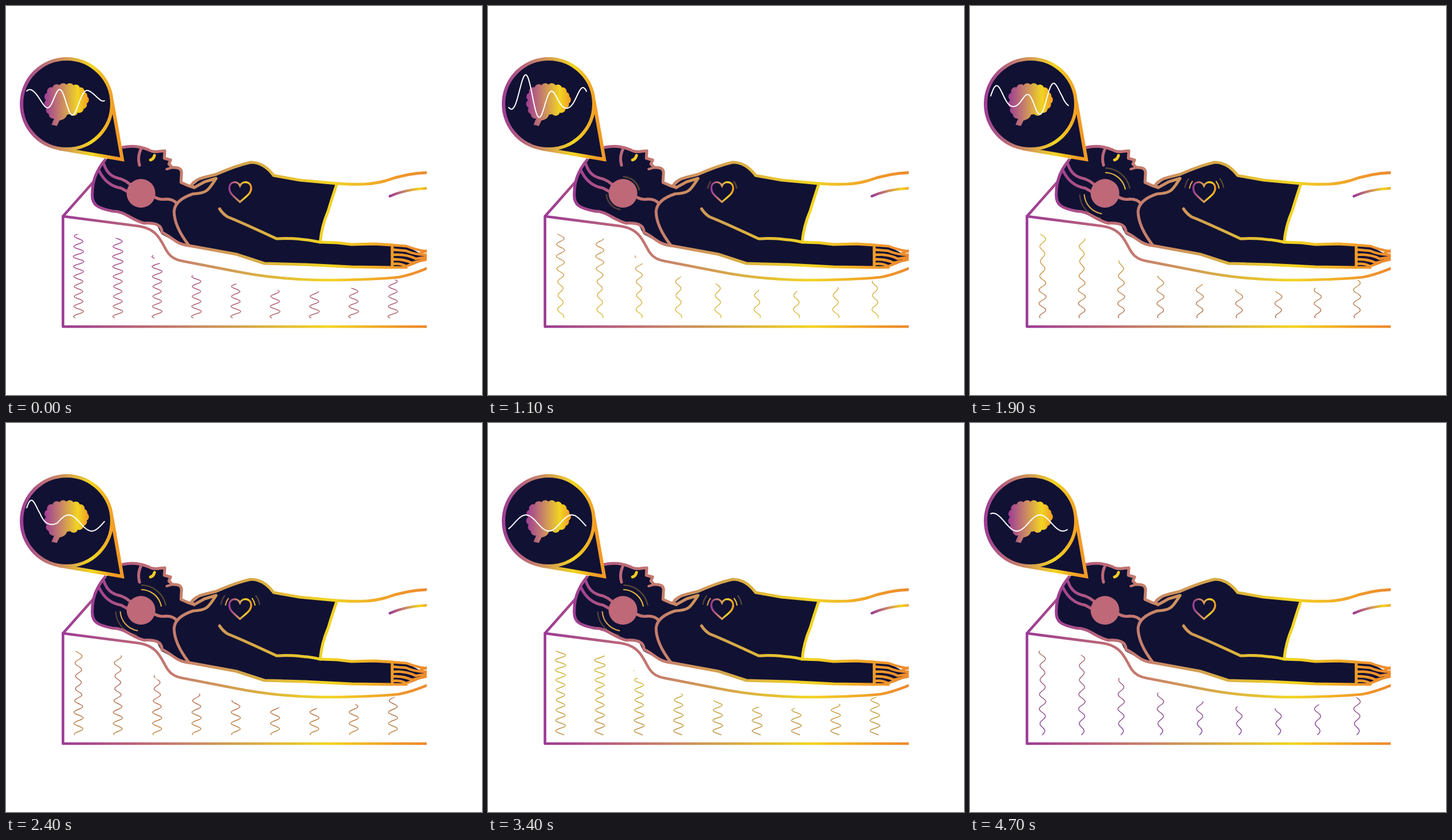
Write an HTML page that moves like this. It is 827 px wide and 677 px high and loops after 4800 ms.

```html
<!DOCTYPE html>
<html lang="en">
<head>
<meta charset="utf-8">
<title>Sound bed</title>
<style>
html, body { margin: 0; width: 100%; height: 100%; overflow: hidden; background: #fff; }
svg { display: block; width: 100vw; height: 100vh; }
.line { fill: none; stroke: url(#main); stroke-width: 5; stroke-linecap: round; stroke-linejoin: round; }
.bed { stroke-width: 4.6; }
.dark { fill: #111133; }
</style>
</head>
<body>
<svg viewBox="0 0 827 677">
  <defs>
    <linearGradient id="main" gradientUnits="userSpaceOnUse" x1="98" x2="731" y1="0" y2="0">
      <stop offset="0" stop-color="#9c3b96"/>
      <stop offset=".21" stop-color="#bb6678"/>
      <stop offset=".35" stop-color="#c98668"/>
      <stop offset=".53" stop-color="#d8ac44"/>
      <stop offset=".73" stop-color="#f2d522"/>
      <stop offset=".92" stop-color="#f0982a"/>
      <stop offset="1" stop-color="#ee8a2e"/>
    </linearGradient>
    <linearGradient id="warm">
      <stop offset="0" stop-color="#9c3b96"/>
      <stop offset=".35" stop-color="#c57e6c"/>
      <stop offset=".75" stop-color="#f2d522"/>
      <stop offset="1" stop-color="#f29a25"/>
    </linearGradient>
    <linearGradient id="ring" href="#warm" gradientUnits="userSpaceOnUse" x1="24" x2="190" y1="0" y2="0"/>
    <linearGradient id="hair" gradientUnits="userSpaceOnUse" x1="145" x2="290" y1="0" y2="0">
      <stop offset="0" stop-color="#9c3b96"/>
      <stop offset=".6" stop-color="#bc6878"/>
      <stop offset="1" stop-color="#c57c70"/>
    </linearGradient>
    <linearGradient id="flow" gradientUnits="userSpaceOnUse" x1="0" x2="0" y1="400" y2="1480"></linearGradient>
    <clipPath id="edge"><rect width="731" height="677"/></clipPath>
    <clipPath id="underBed">
      <path d="M85 393 204 405Q252 412 260 445L325 469Q400 485 468 494 537 501 605 490L700 472V600H85Z"/>
    </clipPath>
  </defs>

  <g clip-path="url(#edge)">
    <g class="line bed">
      <path d="M152 306 99 366V558H740"/>
      <path d="M99 366 230 383C266 388 270 413 281 429Q289 441 307 444L400 462Q470 476 550 477 630 477 682 472 704 468 735 455"/>
    </g>
    <g id="columns" clip-path="url(#underBed)" fill="none" stroke="url(#flow)" stroke-width="1.4"></g>

    <g class="dark">
      <path d="M170 270 203 246Q228 241 247 250L262 254 276 251 275 264 286 268 283 275 290 280 302 281 306 288 304 307 322 314 338 301 365 293 400 277 425 271Q448 272 465 295L510 303 575 309Q556 355 546 411L600 414 671 416V455L520 450 449 448 400 433 318 417 300 413 270 397 262 381 240 379 205 360 172 356 152 344 150 320 157 294Z"/>
      <path d="M671 418 698 419 731 437V441L697 454 671 455Z"/>
    </g>

    <g class="line">
      <path stroke="url(#hair)" d="M203 246Q225 241 247 250M172 268C157 286 150 306 150 325 148 347 160 352 185 357 208 357 216 372 240 378 258 377 271 380 271 394 289 402 297 416 318 417"/>
      <path d="M247 250Q255 255 266 253L276 252 275 265 286 268 283 275 289 281Q305 280 305 290L304 307Q316 313 327 316"/>
      <path d="M279 284 289 281" stroke-width="4"/>
      <path stroke="url(#hair)" d="M170 275C176 294 187 298 200 301Q208 304 215 310M162 287C170 304 182 314 200 317L211 323M234 250Q228 263 232 277"/>
      <path d="M258 260Q256 267 251 268" stroke="#f2cc25"/>
      <path d="M257 332Q267 338 278 336 291 336 297 344"/>
      <path d="M318 417C301 395 292 374 292 357Q294 337 325 327C351 326 352 319 365 300L345 306 327 316 322 312Q328 302 345 298L365 293Q399 278 425 272 448 272 465 295L510 303 575 309Q565 339 560 356 548 384 546 411"/>
      <path d="M318 417 400 432 449 448 520 450 600 454 671 455V416L640 414 600 415 575 412 546 411Q510 403 470 405 408 376 385 367 377 362 371 353"/>
      <path d="M575 309C617 312 639 310 660 304 680 297 708 290 735 290"/>
      <path d="M667 331C687 322 708 318 735 317" stroke="url(#warm)" stroke-width="4.5"/>
      <g stroke-width="4.5">
        <path d="M671 416 696 418Q714 425 735 428M671 424 695 426Q713 434 735 433"/>
        <path d="M671 433Q696 431 712 440L735 436M671 441Q690 440 705 447L731 441M671 449Q685 447 695 453L711 447M671 455H696M720 430 735 424"/>
      </g>
    </g>
    <circle cx="234.500" cy="326" r="25" fill="#be6878"/>
    <path d="M406.500 341C394 330 388 326 388 317 388 305 402 303 406.500 313 411 303 426 305 426 317 426 326 419 330 406.500 341Z" fill="none" stroke="url(#warm)" stroke-width="3.300"/>
    <g id="pulses" fill="none" stroke-width="2.200" stroke-linecap="round"></g>
  </g>

  <g stroke="url(#ring)" stroke-width="6">
    <path class="dark" d="M185 170 202 267 97 249Z"/>
    <circle class="dark" cx="105.500" cy="170.500" r="78.500"/>
  </g>
  <path transform="translate(7.400 11.500) scale(.93)" fill="url(#warm)" d="M72 190A8 8 0 0 1 68 178 8 8 0 0 1 67 164 8 8 0 0 1 69 150 8 8 0 0 1 79 140 8 8 0 0 1 92 136 8 8 0 0 1 105 135 8 8 0 0 1 118 136 8 8 0 0 1 130 140 8 8 0 0 1 139 149 8 8 0 0 1 144 157 8 8 0 0 1 143 170 8 8 0 0 1 137 180 8 8 0 0 1 126 187 8 8 0 0 1 112 190L106 191Q104 199 92 202L87 212 77 210 82 198A8 8 0 0 1 72 190Z"/>
  <path id="brainwave" fill="none" stroke="#fff" stroke-width="2" stroke-linecap="round"/>
</svg>
<script>
const LOOP = 4800, STEP = 100, SCROLL = 0.2025, RISE = 0.2, TURN = 2 * Math.PI;
const byId = id => document.getElementById(id);
const clamp = v => Math.max(0, Math.min(1, v));
const cycle = v => Math.cos(TURN * v);
const bump = v => Math.exp(-v * v);
const toPath = points => 'M' + points.map(([x, y]) => x.toFixed(1) + ' ' + y.toFixed(1)).join('L');

function add(parent, tag, attrs = {}) {
  const node = document.createElementNS('http://www.w3.org/2000/svg', tag);
  for (const key in attrs) node.setAttribute(key, attrs[key]);
  return parent.appendChild(node);
}

// Brain signal: k counts crests. Busy rhythm first, then a slow one in step with it.
function busy(p) {
  const k = (p - 44) / 48.7;
  const swing = 17 + 9 * cycle((k - 1.2) / 2.1) + 14 * bump((k - 4.9) / 0.9);
  return 162 + 8 * cycle((k - 1.1) / 2.6) - swing * cycle(k);
}
function calm(p) {
  const k = (p - 595) / 79.7;
  return 174 - (14 + 12 * bump((k - 4.4) / 0.5)) * cycle(k);
}
function signal(p) {
  const mix = clamp((p - 545) / 30);
  return busy(p) * (1 - mix) + calm(p) * mix;
}
function drawBrainwave(t) {
  const height = x => signal(x + SCROLL * t);
  // The line stops short when it runs into a deep trough.
  const end = 172 - Math.max(0, height(172) - 165) ** 2 / 130;
  const points = [];
  for (let x = 36; x < end; x++) points.push([x, height(x)]);
  byId('brainwave').setAttribute('d', toPath(points));
}

// Vibration: a rising wave that is wider and faster where its energy peaks.
const PERIOD = 640;
function vibration(u) {
  const v = (u - 480) / PERIOD;
  const swing = 6.5 + 1.8 * cycle(v) + cycle(u / 110);
  return swing * Math.sin(TURN * 0.0485 * u + 0.0095 * PERIOD * Math.sin(TURN * v));
}
const columns = Array.from({ length: 9 }, (_, i) => add(byId('columns'), 'path'));
['#a0409a', '#b87860', '#dabc32', '#ae6252', '#d2b834', '#b07458', '#803c98'].forEach((color, i, all) =>
  add(byId('flow'), 'stop', { offset: i / (all.length - 1), 'stop-color': color }));

function drawColumns(t) {
  const shift = RISE * t;
  byId('flow').setAttribute('gradientTransform', `translate(0 ${-shift})`);
  columns.forEach((node, i) => {
    const points = [];
    for (let y = 395; y <= 543; y++) points.push([126 + 68.3 * i + vibration(y + shift), y]);
    node.setAttribute('d', toPath(points));
  });
}

// Two sound arcs on each side of the headphone and of the heart.
const head = { cx: 234.5, cy: 326, rest: 27, inner: 36, spread: 38 };
const heart = { cx: 407, cy: 321, rest: 25, inner: 26, spread: 14 };
const sides = [
  { ...head, angle: -50, color: '#e3b63c' },
  { ...head, angle: 138, color: '#d6a150' },
  { ...heart, angle: 203, color: '#d9a04c' },
  { ...heart, angle: -23, color: '#e7bd32' }
];
const arcs = sides.flatMap(side => [0, 1].map(ring => ({
  ...side,
  full: side.inner + 8 * ring,
  node: add(byId('pulses'), 'path', { stroke: side.color, opacity: ring ? 0.35 : 1 })
})));
function drawPulses(t) {
  const growth = clamp(Math.min(t - 1000, 4000 - t) / 600);
  byId('pulses').setAttribute('opacity', clamp(growth * 2));
  for (const { cx, cy, rest, full, angle, spread, node } of arcs) {
    const r = rest + (full - rest) * growth;
    const at = deg => `${cx + r * cycle(deg / 360)} ${cy + r * cycle(deg / 360 - 0.25)}`;
    node.setAttribute('d', `M${at(angle - spread)}A${r} ${r} 0 0 1 ${at(angle + spread)}`);
  }
}

function render(t) {
  drawBrainwave(t);
  drawColumns(t);
  drawPulses(t);
}

const start = performance.now();
function tick(now) {
  const elapsed = Math.max(0, now - start) % LOOP;
  render(Math.floor(elapsed / STEP) * STEP);
  requestAnimationFrame(tick);
}
render(0);
requestAnimationFrame(tick);
</script>
</body>
</html>
```
